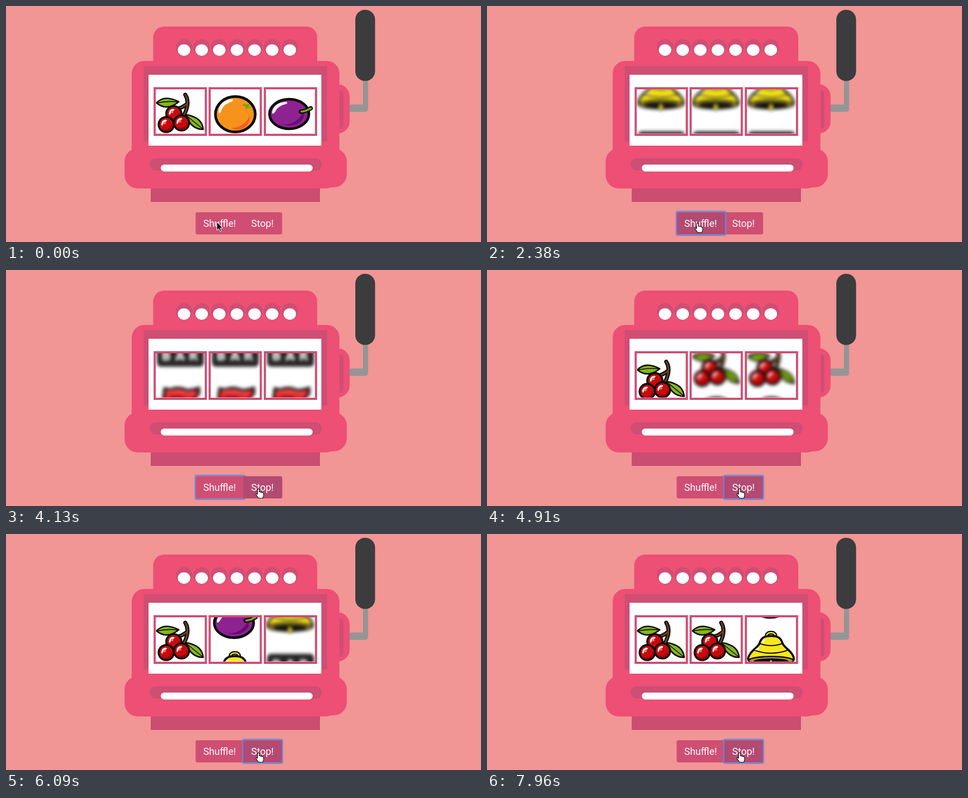
An HTML page that plays this animation: 873 px wide and 436 px high, repeating every 8000 ms.

```html
<!DOCTYPE html>
<html lang="en">
<head>
<meta charset="utf-8">
<title>Slot machine</title>
<style>
  html, body { margin: 0; width: 100%; height: 100%; overflow: hidden; background: #f19595; }
  svg { display: block; width: 873px; height: 436px; }
  .label { font: 18px Roboto, Arial, sans-serif; fill: #fff; }
  .bar { font: bold 23px "DejaVu Sans", sans-serif; fill: #fff; text-anchor: middle; }
  .ink { stroke: #0b0b0b; stroke-linejoin: round; stroke-linecap: round; }
  .line { fill: none; stroke: #0b0b0b; stroke-linecap: round; }
  .ring { fill: none; stroke: #6287dc; stroke-width: 2.6; stroke-opacity: .9; }
</style>
</head>
<body>
<svg viewBox="0 0 873 436" xmlns="http://www.w3.org/2000/svg">
  <defs>
    <clipPath id="window"><rect width="90" height="81.5"/></clipPath>
    <filter id="blur" filterUnits="userSpaceOnUse" x="-12" y="-14" width="114" height="110" color-interpolation-filters="sRGB">
      <feGaussianBlur stdDeviation="3"/>
    </filter>

    <g id="berry">
      <circle r="14" class="ink" fill="#c90a0c" stroke-width="3.6"/>
      <path d="M-9 6Q0 14 9 4Q10 -2 9 -5Q13 6 5 10Q-3 14 -9 6Z" fill="#7d0507"/>
      <path d="M-9 0Q-9 -9 0 -9Q3 -7 -2 -5Q-6 -4 -6 0Q-8 4 -9 0Z" fill="#fff"/>
      <circle cx="-3" cy="-3" r="2.4" fill="#f47a72"/>
    </g>

    <g id="cherry">
      <path d="M1 25Q16 9 42 23Q20 41 1 25Z" class="ink" fill="#86b718" stroke-width="2.6"/>
      <path d="M3 25Q20 21 40 23" class="line" stroke-width="1.6"/>
      <path d="M55 47Q61 47 70 51Q85 57 87 74Q64 74 55 47Z" class="ink" fill="#86b718" stroke-width="2.6"/>
      <path d="M58 50Q70 60 86 73" class="line" stroke-width="1.6"/>
      <path id="stem" d="M54 10Q61 21 56 37Q53 47 48 52M57 27Q49 34 36 37" class="line" stroke-width="7.5"/>
      <path d="M54 10Q61 21 56 37Q53 47 48 52M57 27Q49 34 36 37" fill="none" stroke="#6b421b" stroke-width="3" stroke-linecap="round"/>
      <use href="#berry" x="33" y="45"/>
      <use href="#berry" x="19" y="65"/>
      <use href="#berry" x="47" y="62"/>
    </g>

    <g id="orange">
      <ellipse cx="45" cy="46" rx="36.6" ry="32.8" class="ink" fill="#f7931d" stroke-width="5"/>
      <path d="M38 71Q62 70 71 49Q73 66 57 73Q45 77 38 71Z" fill="#ef6223"/>
      <path d="M14 42Q15 22 37 18Q44 18 38 23Q22 28 19 40Q16 48 14 42Z" fill="#fff"/>
      <path d="M59 27l6 1 6-1-1 4 4 4-6-1-3 3-1-5-6-2z" fill="#6ea51c"/>
    </g>

    <g id="plum">
      <ellipse cx="42.5" cy="45.5" rx="36.2" ry="27.4" class="ink" fill="#8e2291" stroke-width="4.8"/>
      <path d="M27 64Q51 68 65 48Q62 42 70 41Q72 52 63 60Q49 71 27 64Z" fill="#640f70"/>
      <path d="M11 43Q13 26 35 23Q42 24 37 27Q22 30 17 41Q12 48 11 43Z" fill="#fff"/>
      <path d="M64 41Q72 41 82 35" class="line" stroke-width="8"/>
      <path d="M65 41Q72 41 82 35" fill="none" stroke="#7fae1b" stroke-width="3.6" stroke-linecap="round"/>
    </g>

    <g id="bell">
      <path d="M36 22Q35 13 44 13Q53 13 52 22" class="line" stroke-width="7"/>
      <path d="M36 22Q35 13 44 13Q53 13 52 22" fill="none" stroke="#f5e31c" stroke-width="2.4"/>
      <path d="M44 19C31 19 26 23 23 32C20 41 9 44 4 55Q0 62 4 65Q44 78 84 65Q88 62 84 55C79 44 68 41 65 32C62 23 57 19 44 19Z" class="ink" fill="#f8e71c" stroke-width="3.8"/>
      <ellipse cx="44" cy="64.5" rx="41" ry="7.5" class="ink" fill="#b29a32" stroke-width="2.6"/>
      <ellipse cx="44" cy="65.5" rx="32" ry="5" fill="#0b0b0b"/>
      <path d="M44 62l4 4q4 8-4 8t-4-8z" class="ink" fill="#f8e71c" stroke-width="2"/>
      <path d="M23 33Q44 41 65 33M12 45Q44 57 76 45" class="line" stroke-width="2"/>
      <path d="M31 26Q27 30 27 32Q31 33 33 27ZM19 41Q15 44 14 45Q20 47 23 42Z" fill="#fff"/>
    </g>

    <g id="bar">
      <rect x="3" y="27" width="84" height="37" rx="6" fill="#262626" stroke="#111" stroke-width="2"/>
      <g class="bar"><text x="19" y="53.5">B</text><text x="44.5" y="53.5">A</text><text x="69" y="53.5">R</text></g>
    </g>

    <g id="seven">
      <path d="M16 17Q24 21 34 17Q46 15 56 20Q66 21 79 16L79 27Q60 46 57 74L30 74Q33 54 51 38Q38 33 28 37L25 43L13 41Z" class="ink" fill="#ea262c" stroke-width="4.4"/>
      <path d="M19 23Q40 20 70 26" fill="none" stroke="#f6716c" stroke-width="3"/>
    </g>
  </defs>

  <rect width="873" height="436" fill="#f19595"/>

  <!-- lever -->
  <path d="M625 182H656V130H665.5V190Q665.5 195.500 660 195.500H625Z" fill="#959595"/>
  <rect x="642" y="7" width="36.300" height="131.500" rx="18" fill="#3c3c3e"/>

  <!-- cabinet -->
  <g fill="#ee4f74">
    <rect x="270.500" y="38" width="301.500" height="90" rx="20"/>
    <rect x="580" y="144.500" width="51.500" height="91" rx="22"/>
    <rect x="231" y="101.500" width="381.700" height="200" rx="23"/>
    <rect x="218" y="263" width="394" height="74" rx="24"/>
    <rect x="560" y="263" width="66.300" height="72" rx="24"/>
  </g>
  <g fill="#cf4e74">
    <path d="M613 155Q620 156 620 163V219Q620 226 613 227Z"/>
    <rect x="253" y="111" width="337" height="139.500"/>
    <rect x="264" y="281.500" width="316.500" height="22.500" rx="11.200"/>
  </g>
  <rect x="266" y="337" width="311" height="25" fill="#cb4d72"/>
  <rect x="284.500" y="293" width="279" height="12.700" rx="6.300" fill="#fff"/>
  <rect x="262" y="127" width="317.500" height="131" fill="#fff"/>
  <g id="lights"></g>
  <g id="reels"></g>

  <!-- buttons -->
  <path id="shuffle" d="M352 381H437V422H352Q348.500 422 348.500 418.500V384.500Q348.500 381 352 381Z"/>
  <path id="stop" d="M437 381H504Q507.500 381 507.500 384.500V418.500Q507.500 422 504 422H437Z" fill="#cf4e74"/>
  <rect id="ringA" class="ring" x="348" y="379.500" width="91" height="44" rx="2.500"/>
  <path id="stopDark" d="M436 381H504Q507.500 381 507.500 384.500V418.500Q507.500 422 504 422H436Z" fill="#b24a71"/>
  <rect id="ringB" class="ring" x="435" y="379.500" width="73" height="44" rx="2.500"/>
  <text class="label" x="362.500" y="408">Shuffle!</text>
  <text class="label" x="450.500" y="408">Stop!</text>

  <!-- pointers -->
  <path id="arrow" d="M387.500 399V414.500l3.500-3.300 2.400 5.500 2.600-1.100-2.400-5.400h4.800Z" fill="#111" stroke="#fff" stroke-width="1"/>
  <path id="hand" d="M-1.600 1.200Q0 -1 1.600 1.200V6Q3.200 5 4.300 6.600Q6 5.800 7 7.400Q9 6.800 9.400 9V12Q9 14.500 8 17.500H0Q-1 15 -4.300 11.300Q-5 9 -3.200 9L-1.600 10.300Z" fill="#fff" stroke="#111" stroke-width="1.100" stroke-linejoin="round"/>
</svg>

<script>
const LOOP = 8000, PITCH = 88, TURN = 6 * PITCH;
const NAMES = ['cherry', 'orange', 'plum', 'bell', 'bar', 'seven'];
const START = 1150, SYNC = 1500, SLOWDOWN = 1000;

// Distance scrolled by a free-running reel
const SPIN = [[SYNC, 0], [1720, 336], [3140, 2528], [4130, 4087], [4910, 5297], [6090, 7173], [8000, 10161]];
const POINTER_X = [[2650, 387], [3140, 434], [3500, 464]];
const POINTER_Y = [[2650, 401], [3140, 404]];
const REELS = [
  { x: 275.5, from: 0, stop: 4187, end: TURN },
  { x: 376.5, from: PITCH, stop: 5990, end: TURN },
  { x: 478, from: 2 * PITCH, stop: 7695, end: 4 * PITCH }
];

const $ = id => document.getElementById(id);
const show = (id, on) => $(id).setAttribute('visibility', on ? 'visible' : 'hidden');

function along(keys, t) {
  if (t <= keys[0][0]) return keys[0][1];
  for (let i = 1; i < keys.length; i++) {
    const [t0, v0] = keys[i - 1], [t1, v1] = keys[i];
    if (t <= t1) return v0 + (v1 - v0) * (t - t0) / (t1 - t0);
  }
  return keys[keys.length - 1][1];
}

// cubic-bezier(0, 0, .58, 1)
function easeOut(p) {
  if (p >= 1) return 1;
  let lo = 0, hi = 1;
  for (let i = 0; i < 24; i++) {
    const u = (lo + hi) / 2;
    if (u * u * (1.74 - 0.74 * u) < p) lo = u; else hi = u;
  }
  return lo * lo * (3 - 2 * lo);
}

function offset(reel, t) {
  if (t < START) return reel.from;
  if (t < SYNC) return reel.from + (TURN - reel.from) * (t - START) / (SYNC - START);
  const s = along(SPIN, Math.min(t, reel.stop)) % TURN;
  return t < reel.stop ? s : s + (reel.end - s) * easeOut((t - reel.stop) / SLOWDOWN);
}

function build() {
  let dark = '', white = '';
  for (let i = 0; i < 7; i++) {
    const x = 327.2 + i * 32.4;
    dark += `<circle cx="${x}" cy="76.5" r="15.3" fill="#cf4e74"/>`;
    white += `<ellipse cx="${x}" cy="81.3" rx="11.5" ry="10.6" fill="#fff"/>`;
  }
  $('lights').innerHTML = dark + white;

  let strip = '';
  for (let i = -1; i < 8; i++) strip += `<use href="#${NAMES[(i + 6) % 6]}" y="${i * PITCH}"/>`;
  $('reels').innerHTML = REELS.map((r, i) => `
    <g transform="translate(${r.x} 154)">
      <g clip-path="url(#window)"><g id="lens${i}"><g id="strip${i}">${strip}</g></g></g>
      <rect x="-2.2" y="-2" width="94" height="86" fill="none" stroke="#cf4e74" stroke-width="4"/>
    </g>`).join('');
}

function draw(t) {
  REELS.forEach((r, i) => {
    $('strip' + i).setAttribute('transform', `translate(0 ${-offset(r, t).toFixed(2)})`);
    const lens = $('lens' + i);
    if (t >= START && t < r.stop) lens.setAttribute('filter', 'url(#blur)');
    else lens.removeAttribute('filter');
  });

  const x = along(POINTER_X, t), y = along(POINTER_Y, t);
  const overStop = x > 436;
  const clicked = t >= REELS[0].stop;
  $('shuffle').setAttribute('fill', t >= 650 && !overStop ? '#b24a71' : '#cf4e74');
  show('stopDark', overStop);
  show('ringA', t >= 1120 && !clicked);
  show('ringB', clicked);
  show('arrow', t < 500);
  show('hand', t >= 500);
  $('hand').setAttribute('transform', `translate(${x} ${y})`);
}

function tick() {
  draw(performance.now() % LOOP);
  requestAnimationFrame(tick);
}

build();
tick();
</script>
</body>
</html>
```
